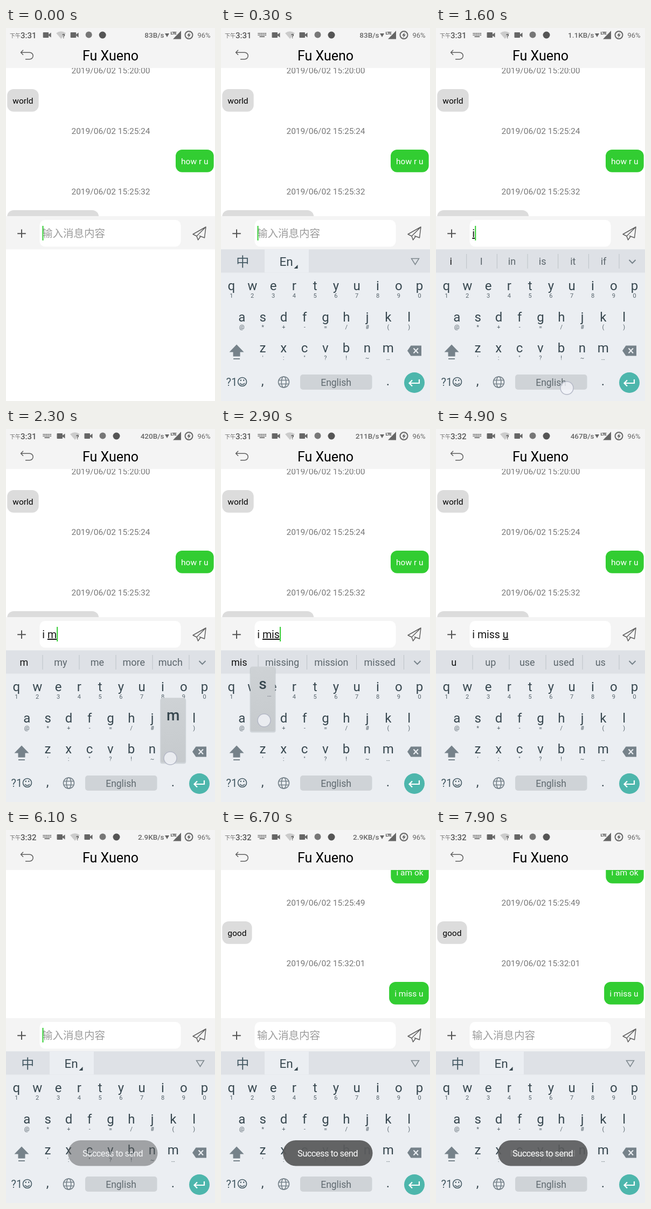
Recreate the animation shown at these times as an HTML page. Size 388 px wide and 690 px high, loop 8 s.

```html
<!DOCTYPE html>
<html lang="en">
<head>
<meta charset="utf-8">
<title>Chat</title>
<style>
html, body { margin: 0; width: 100%; height: 100%; overflow: hidden; background: #fff; }
svg { display: block; width: 100vw; height: 100vh; }
text { font-family: Roboto, 'Noto Sans CJK SC', 'Noto Sans CJK', sans-serif; white-space: pre; }
.mid { text-anchor: middle; }
.line { fill: none; stroke: #606060; stroke-width: 1.5; stroke-linejoin: round; }
.key { font-size: 24px; fill: #37474f; text-anchor: middle; }
.sub { font-size: 11px; fill: #55626a; text-anchor: middle; }
.msg { font-size: 15.5px; }
.date { font-size: 15.5px; fill: #777; text-anchor: middle; }
.word { font-size: 18px; fill: #5b656b; text-anchor: middle; }
.input { font-size: 19.5px; }
.note { font-size: 16.5px; letter-spacing: -.55px; fill: #fff; text-anchor: middle; }
</style>
</head>
<body>
<svg id="stage" viewBox="0 0 388 690" preserveAspectRatio="none">
  <defs>
    <linearGradient id="popFill" x2="0" y2="1">
      <stop offset="0" stop-color="#ced2d5"/><stop offset="1" stop-color="#c6cacd"/>
    </linearGradient>
    <g id="cam" fill="#666"><rect x="-7.5" y="-5" width="10.5" height="10" rx="1"/><path d="M3 -1L7.5 -4.5V4.5L3 1Z"/></g>
  </defs>
  <rect width="388" height="690" fill="#fff"/>
  <g id="list"></g>

  <rect width="388" height="74" fill="#f4f4f4"/>
  <text x="7" y="18" font-size="10" fill="#666">下午</text>
  <text id="clock" x="27" y="19" font-size="15" font-weight="500" fill="#555"></text>
  <g id="kbIcon" stroke="#777" stroke-width="2">
    <path d="M68.500 10H84M68.500 13H84" stroke-dasharray="2 .7"/>
    <path d="M71.500 16H81"/>
  </g>
  <g id="icons">
    <use href="#cam" x="102" y="13"/>
    <path d="M119 9.500Q128 3 137 9.500L128 20Z" fill="#cbcbcb"/>
    <text x="130" y="19" font-size="11" font-weight="700" fill="#555">?</text>
    <use href="#cam" x="153" y="13"/>
    <circle cx="179.500" cy="12.500" r="6" fill="#777"/>
    <circle cx="205" cy="13" r="6.500" fill="#555"/>
  </g>
  <g id="net">
    <text id="speed" x="293.500" y="18" font-size="13.500" font-weight="500" fill="#666" text-anchor="end"></text>
    <path d="M295 10H303L299 17Z" fill="#666"/>
  </g>
  <path d="M310 20.500L325 5V20.500Z" fill="#666"/>
  <text x="305.500" y="12" font-size="8" font-weight="700" letter-spacing="-.9" fill="#444">LTE</text>
  <circle cx="339.500" cy="13" r="7" fill="none" stroke="#666" stroke-width="2"/>
  <path d="M341 8L336 14H339L338 18.500L343 12H340Z" fill="#666"/>
  <text x="355.500" y="18" font-size="13" fill="#666">96%</text>
  <path class="line" d="M32 40.800L27.500 45.300L32 49.800M27.500 45.300H44A6.200 6.200 0 0 1 44 57.700H36"/>
  <text class="mid" x="194" y="59.500" font-size="25">Fu Xueno</text>

  <rect y="348" width="388" height="61.500" fill="#f4f4f4"/>
  <path d="M29 372.500V388M21.200 380.200H36.800" stroke="#555" stroke-width="2"/>
  <rect x="62.500" y="355" width="262" height="49.500" rx="10" fill="#fff"/>
  <path class="line" d="M371 368L347 381.500L354 385L371 368L368.500 388L359 384.500M354 385L356.500 392L361 386"/>
  <text id="hint" class="input" x="67" y="387" fill="#9b9b9b">输入消息内容</text>
  <text class="input" x="67.300" y="387" fill="#111"><tspan id="done"></tspan><tspan id="compose" text-decoration="underline"></tspan></text>
  <rect id="caret" y="366" width="2" height="27" fill="#32cd32"/>

  <g id="board">
    <rect y="409.500" width="388" height="281" fill="#ebeef2"/>
    <rect y="409.500" width="388" height="43" fill="#dee1e6"/>
    <g id="tabs">
      <rect x="81" y="409.500" width="82" height="43" fill="#ebeef2"/>
      <text class="mid" x="40.300" y="440.500" font-size="24" fill="#455a64">中</text>
      <text class="mid" x="121" y="440" font-size="22.500" fill="#37474f">En</text>
      <path d="M142.500 438V445H135.500Z" fill="#37474f"/>
      <path d="M353.500 426.500H367.500L360.500 437.500Z" fill="none" stroke="#7d878d" stroke-width="1.500"/>
    </g>
    <g id="words"></g>
    <g id="keys"></g>
    <g fill="#76828a">
      <path d="M29 585.500L42.500 599.500H35.500V607.500H22.500V599.500H15.500Z"/>
      <rect x="23" y="611" width="12" height="2"/>
      <path d="M346 597L352.500 587.500H372V606.500H352.500Z"/>
    </g>
    <path d="M357.500 592.500L366 601.500M366 592.500L357.500 601.500" stroke="#ebeef2" stroke-width="2"/>
    <text x="9.500" y="662" font-size="20" fill="#455a64">?1</text>
    <g fill="none" stroke="#455a64" stroke-width="1.600">
      <circle cx="39.500" cy="654.500" r="8"/><path d="M35 657Q39.500 662 44 657"/>
      <path d="M36.800 650.500V653M42.200 650.500V653" stroke-width="2"/>
    </g>
    <text class="key" x="77" y="661">,</text>
    <g fill="none" stroke="#76828a" stroke-width="1.600">
      <circle cx="116.500" cy="655" r="10"/><ellipse cx="116.500" cy="655" rx="4.300" ry="10"/>
      <path d="M107.500 651.500H125.500M107.500 658.500H125.500"/>
    </g>
    <rect x="147" y="641" width="133.500" height="28" rx="5" fill="#cfd3d7"/>
    <text class="mid" x="213.500" y="661.500" font-size="17.500" fill="#606a70">English</text>
    <text class="key" x="310" y="661">.</text>
    <circle cx="359" cy="656" r="19" fill="#4db6ac"/>
    <path d="M368 650V657H350M355 651.500L349.500 657L355 662.500" fill="none" stroke="#fff" stroke-width="2.200"/>
  </g>

  <g id="pop">
    <rect x="-24" y="-102" width="48" height="121" rx="4" fill="#9aa3a9" opacity=".35"/>
    <rect x="-22.700" y="-103" width="45.400" height="119.500" rx="3" fill="url(#popFill)"/>
    <text id="popKey" class="mid" y="-61.500" font-size="28" font-weight="500" fill="#37474f"></text>
    <text id="popSub" class="mid" x="12" y="-48" font-size="12" fill="#667"></text>
  </g>
  <circle id="touch" r="12" fill="#f3f4f9" fill-opacity=".8" stroke="#b4b8c6" stroke-width="1.500"/>

  <g id="toast">
    <rect x="115" y="574" width="166.500" height="47.500" rx="23.700" fill="#5a5b5c" opacity=".94"/>
    <text id="ghost" class="note" x="198" y="604" opacity=".15">No message read</text>
    <text class="note" x="198" y="604">Success to send</text>
  </g>
</svg>
<script>
const LOOP = 8000, STEP = 100, KEY_W = 38.8;
const $ = id => document.getElementById(id);
const show = (id, on) => $(id).setAttribute('visibility', on ? 'visible' : 'hidden');
const move = (id, x, y) => $(id).setAttribute('transform', `translate(${x} ${y})`);
const text = (cls, x, y, s, extra = '') => `<text class="${cls}" x="${x}" y="${y}" ${extra}>${s}</text>`;

const pen = document.createElement('canvas').getContext('2d');
function widthOf(s, size) {
  pen.font = `${size}px Roboto, sans-serif`;
  return pen.measureText(s).width;
}

// Keyboard rows: letters, small labels, first centre, baseline
const ROWS = [
  ['qwertyuiop', '1234567890', 19.4, 485],
  ['asdfghjkl', '@*+-=/#()', 38.8, 542.5],
  ['zxcvbnm', '\':"?!~…', 77.4, 600.3]
];
const keys = {};
let keyMarkup = '';
for (const [letters, subs, x0, y] of ROWS) {
  [...letters].forEach((c, i) => {
    const x = x0 + i * KEY_W;
    keys[c] = { x, y };
    keyMarkup += text('key', x, y, c) + text('sub', x, y + 14, subs[i]);
  });
}
$('keys').innerHTML = keyMarkup;

// Chat items: time, message, own message?, date centre
const BEFORE = [
  ['15:20:00', 'world', false, 78],
  ['15:25:24', 'how r u', true, 190],
  ['15:25:32', 'what are you doing now', false, 302]
];
const AFTER = [
  ['15:25:40', 'i am ok', true, 22],
  ['15:25:49', 'good', false, 134],
  ['15:32:01', 'i miss u', true, 246]
];
function chat([time, msg, own, y]) {
  const w = msg.length > 20 ? 170 : widthOf(msg, 15.5) + 20.2;
  const x = own ? 385.7 - w : 2.2, top = y + 35;
  return text('date', 194.5, y + 5.7, '2019/06/02 ' + time) +
    `<rect x="${x}" y="${top}" width="${w}" height="41.7" rx="12" fill="${own ? '#32cd32' : '#dcdcdc'}"/>` +
    text('msg', x + 10.1, top + 26.7, msg, `fill="${own ? '#fff' : '#000'}"`);
}

function suggest(list, cols) {
  if (!list) return '';
  const n = list.length;
  const ends = cols || list.map((_, i) => 340 * (i + 1) / n);
  return list.map((w, i) => {
    const x = ((ends[i - 1] || 0) + ends[i]) / 2 - 0.7;
    return text('word', x, 438, w, i ? '' : 'style="fill:#111"') +
      `<path d="M${ends[i]} 418V445" stroke="#bcc2c7"/>`;
  }).join('') + '<path d="M358.500 429L364.500 435L370.500 429" fill="none" stroke="#76828a" stroke-width="2"/>';
}

// Typing: start, settled text, composing text, suggestions, column ends
const WIDE = [69, 159.5, 251.5, 339.5];
const TYPING = [
  [0, '', ''],
  [1400, '', 'i', ['i', 'I', 'in', 'is', 'it', 'if']],
  [1800, 'i ', ''],
  [2200, 'i ', 'm', ['m', 'my', 'me', 'more', 'much']],
  [2500, 'i ', 'mi', ['mi', 'miss', 'mine', 'mind', 'might']],
  [2800, 'i ', 'mis', ['mis', 'missing', 'mission', 'missed'], WIDE],
  [3200, 'i ', 'miss', ['miss', 'missing', 'mission', 'missed'], WIDE],
  [3700, 'i miss ', ''],
  [4100, 'i miss ', 'u', ['u', 'up', 'use', 'used', 'us']],
  [5100, '', '']
];
const SPEEDS = [[0, '83B/s'], [700, '1.1KB/s'], [1700, '420B/s'], [2700, '211B/s'], [3700, '160B/s'],
  [4700, '467B/s'], [5900, '2.9KB/s'], [6800, '1.4KB/s'], [7800, '']];
const POPS = [[1400, 1500, 'i'], [2200, 2400, 'm'], [2500, 2600, 'i'], [2800, 3000, 's'], [3200, 3400, 's'], [4100, 4200, 'u']];
const TOUCHES = [[1100, 1500, 288, 498], [1600, 1800, 243, 666], [2100, 2400, 305, 609], [2500, 2600, 289, 497],
  [2800, 3000, 80, 539], [3200, 3400, 79, 540], [3500, 3700, 236, 655], [4000, 4200, 251, 492], [4500, 4700, 359, 382]];
const CARET_OFF = [[700, 1200], [4700, 5100], [6400, 6900], [7400, 8000]];

const latest = (list, t) => list.filter(e => e[0] <= t).pop();
const active = (list, t) => list.find(e => t >= e[0] && t < e[1]);
const clamp = v => Math.max(0, Math.min(1, v));

function draw(t) {
  const up = 1 - (1 - clamp((t - 20) / 260)) ** 2;
  move('board', 0, 281 * (1 - up));
  const shifted = t >= 200;
  show('kbIcon', shifted);
  move('icons', shifted ? 0 : -25.8, 0);

  $('clock').textContent = t < 4100 ? '3:31' : '3:32';
  const speed = latest(SPEEDS, t)[1];
  $('speed').textContent = speed;
  show('net', speed);

  const items = t < 5900 ? BEFORE : t < 6300 ? [] : AFTER;
  $('list').innerHTML = items.map(chat).join('');

  const [, done, compose, list, cols] = latest(TYPING, t);
  $('done').textContent = done;
  $('compose').textContent = compose;
  show('hint', !done && !compose);
  show('caret', !active(CARET_OFF, t));
  $('caret').setAttribute('x', 67.5 + widthOf(done + compose, 19.5));
  show('tabs', !list);
  $('words').innerHTML = suggest(list, cols);

  const pop = active(POPS, t);
  show('pop', pop);
  if (pop) {
    const k = keys[pop[2]];
    move('pop', k.x, k.y);
    $('popKey').textContent = pop[2];
    $('popSub').textContent = pop[2] === 's' ? '…' : '';
  }
  const touch = active(TOUCHES, t);
  show('touch', touch);
  if (touch) move('touch', touch[2], touch[3]);

  $('toast').setAttribute('opacity', clamp((t - 5920) / 330) * (t < 7800 ? 1 : 0.97));
  show('ghost', t >= 7800);
}

const start = performance.now();
let last = -1;
function tick() {
  const t = Math.floor(((performance.now() - start) % LOOP) / STEP) * STEP;
  if (t !== last) draw(last = t);
  requestAnimationFrame(tick);
}
tick();
</script>
</body>
</html>
```
